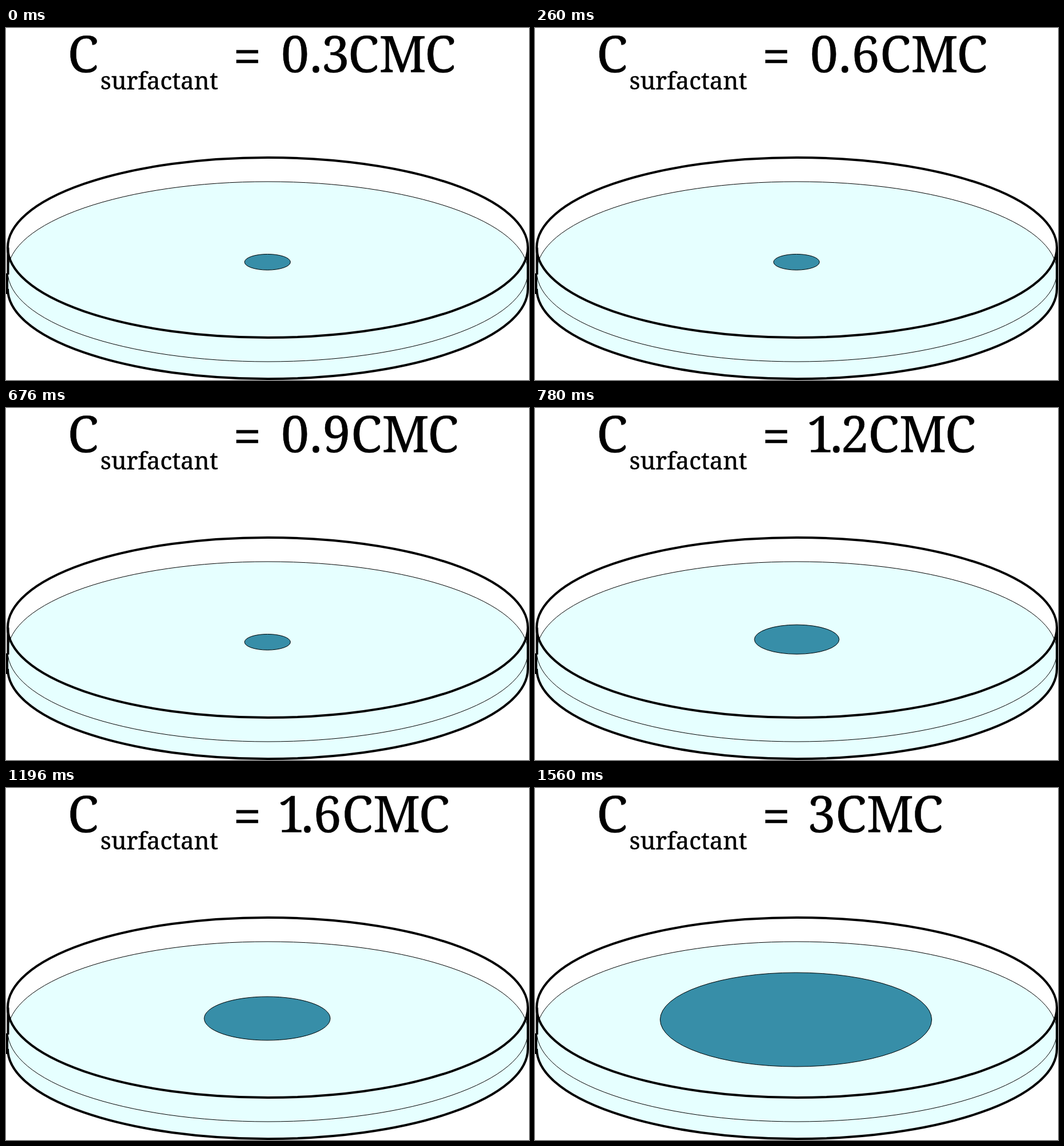
Animation, 913 px wide and 614 px high, one loop 1820 ms. Source, as an HTML page:

```html
<!DOCTYPE html>
<html lang="en">
<head>
<meta charset="utf-8">
<title>Surfactant spreading</title>
<style>
html, body { margin: 0; width: 100%; height: 100%; overflow: hidden; background: #fff; }
svg { display: block; width: 913px; height: 614px; }
text { font: 500 88px "Noto Serif", serif; text-anchor: middle; stroke: #000; stroke-width: .5; }
.sub { font-size: 42px; }
.thin, .thick { fill: none; stroke: #000; }
.thick { stroke-width: 4; }
</style>
</head>
<body>
<svg viewBox="0 0 913 614">
  <text x="134.5" y="77">C</text>
  <text class="sub" x="267.5" y="107">surfactant</text>
  <text x="421" y="81">=</text>
  <text id="value" y="77"></text>

  <path fill="#e6ffff" d="M3 425A454 157 0 0 1 911 425V455A454 157 0 0 1 3 455Z"/>
  <ellipse class="thin" cx="457" cy="425" rx="454" ry="157"/>
  <ellipse id="drop" fill="#378ea8" stroke="#000"/>
  <ellipse class="thick" cx="457" cy="383" rx="454" ry="157"/>
  <path class="thick" d="M3.5 383V430M2 428V464M911 383V455A454 157 0 0 1 3 455"/>
</svg>
<script>
const STEP = 260;
const RATIO = 0.346;

// digits, their centres, centre of the first C, then drop centre and radius
const states = [
  ["0.3", [504.5, 541, 575], 624, 456.5, 408.3, 40],
  ["0.6", [504.5, 541, 577], 629, 456.5, 408.3, 40],
  ["0.9", [504.5, 541, 577], 629, 456.5, 408.3, 40],
  ["1.2", [498, 526, 558], 608.5, 457, 403.7, 74],
  ["1.6", [498, 526, 561], 613.5, 456, 402, 110],
  ["2", [500], 551.5, 457.3, 399.7, 164],
  ["3", [500], 551.5, 455.5, 404, 237]
];
const value = document.getElementById("value");
const drop = document.getElementById("drop");
let shown = -1;

function set(el, attrs) {
  for (const key in attrs) el.setAttribute(key, attrs[key]);
}

function draw() {
  const index = Math.floor(performance.now() / STEP) % states.length;
  if (index !== shown) {
    shown = index;
    const [digits, centres, unitX, cx, cy, rx] = states[index];
    value.textContent = digits + "CMC";
    set(value, { x: [...centres, unitX, unitX + 68.5, unitX + 134].join(" ") });
    set(drop, { cx, cy, rx, ry: rx * RATIO });
  }
  requestAnimationFrame(draw);
}
draw();
</script>
</body>
</html>
```
